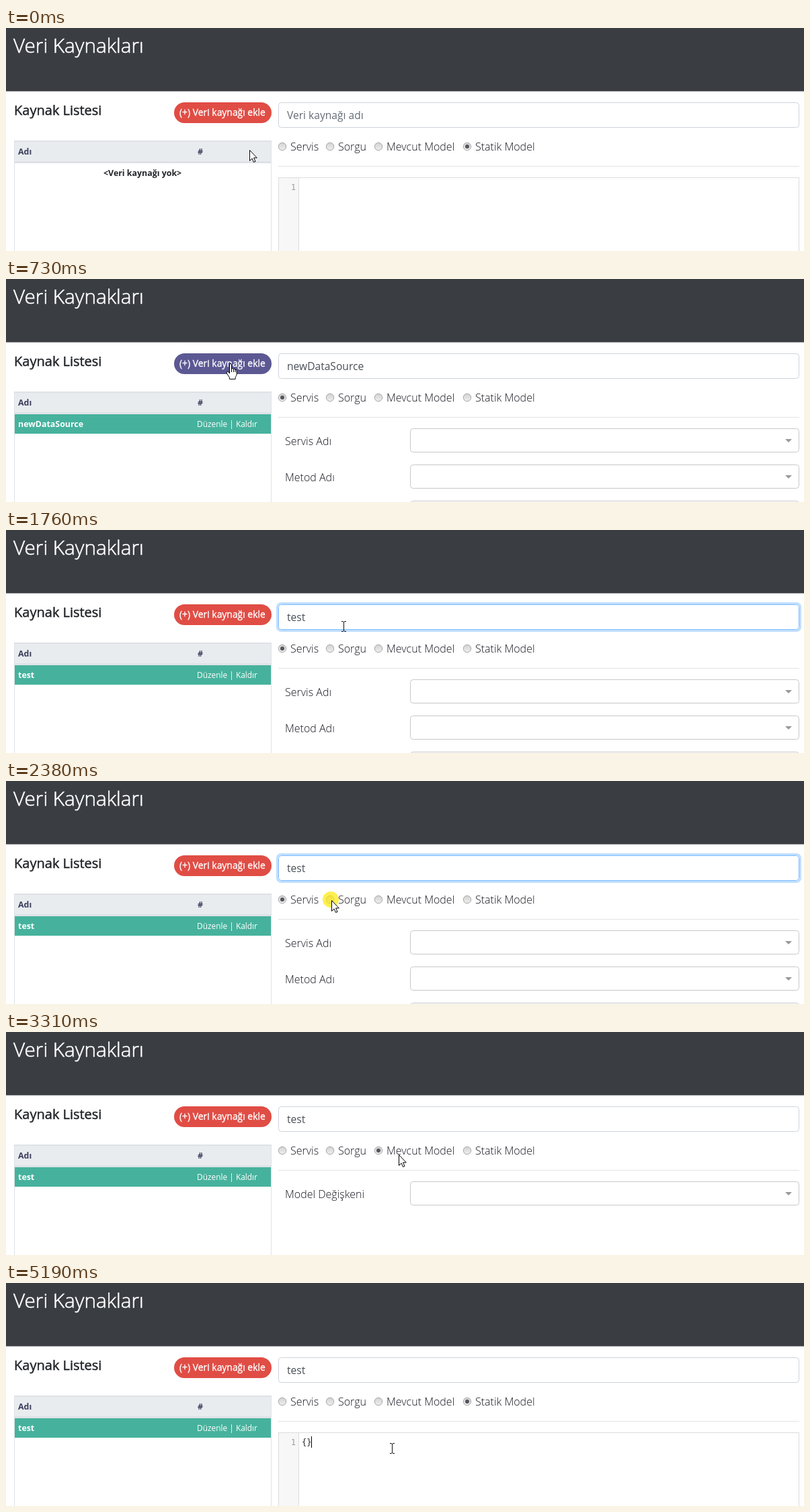
Write an HTML page that moves like this. It is 1187x333 px and loops after 5.21 s.

```html
<!DOCTYPE html>
<html lang="tr">
<head>
<meta charset="utf-8">
<title>Veri Kaynakları</title>
<style>
html, body { margin: 0; width: 1187px; height: 333px; overflow: hidden; background: #fff; }
svg { display: block; font: 16px "Open Sans", "Noto Sans", sans-serif; fill: #212529; }
text { white-space: pre; }
.light { font-weight: 300; fill: #15151f; }
.bold { font-weight: 700; font-size: 12.4px; }
.field { font-size: 15.6px; fill: #495057; }
.title { font-size: 29.7px; font-weight: 300; fill: #fff; stroke: #fff; stroke-width: .6px; }
.heading { font-size: 20px; stroke: #212529; stroke-width: .45px; }
.label { font-size: 13.9px; fill: #fff; stroke: #fff; stroke-width: .35px; }
.box { fill: #fff; stroke: #ced4da; }
.select { fill: #fff; stroke: #c8c8c8; }
.mono { font: 12px "DejaVu Sans Mono", monospace; }
.pointer { fill: #fff; stroke: #000; stroke-linejoin: round; }
</style>
</head>
<body>
<svg width="1187" height="333" viewBox="0 0 1187 333">
  <defs>
    <linearGradient id="knob" x2="0" y2="1">
      <stop stop-color="#d2d2d2"/><stop offset="1" stop-color="#efefef"/>
    </linearGradient>
    <pattern id="wave" width="4" height="3" y="137" patternUnits="userSpaceOnUse">
      <path d="M0 2.5L2 .5L4 2.5" fill="none" stroke="#e03030"/>
    </pattern>
    <g id="select">
      <rect class="select" x="601.5" y=".5" width="578" height="35" rx="4"/>
      <path d="M1159 16h10l-5 5z" fill="#999"/>
    </g>
  </defs>

  <rect width="1187" height="94" fill="#3a3d42"/>
  <path d="M0 94.5H1187" stroke="#999b9d"/>
  <text class="title" x="11" y="37">Veri Kaynakları</text>

  <text class="heading" x="12" y="130">Kaynak Listesi</text>
  <rect id="button" x="250" y="111" width="145" height="31" rx="15.5"/>
  <text class="label" x="258" y="131">(+) Veri kaynağı ekle</text>

  <rect x="12.5" y="168.5" width="382" height="180" fill="#fff" stroke="#dee2e6"/>
  <rect x="12" y="168" width="383" height="34" fill="#dee2e6"/>
  <rect x="13" y="170" width="381" height="29" fill="#e9ecef"/>
  <g class="bold" fill="#3b3f5c">
    <text x="18" y="189">Adı</text>
    <text x="285" y="189">#</text>
  </g>
  <text id="empty" class="bold" x="145" y="221">&lt;Veri kaynağı yok&gt;</text>
  <g id="row" fill="#fff">
    <rect x="13" y="202" width="381" height="29" fill="#46b29d"/>
    <text id="rowName" class="bold" x="18" y="221"></text>
    <text x="284" y="221" font-size="11.9">Düzenle | Kaldır</text>
  </g>

  <rect id="ring" x="403.5" y="109.5" width="778" height="41" rx="5.5" fill="none" stroke="#bfdeff" stroke-width="3"/>
  <rect id="input" class="box" x="405.5" y="111.5" width="774" height="37" rx="4"/>
  <rect id="mark" x="418" y="121" height="18" fill="#3390ff"/>
  <text id="name" class="field" x="418" y="136"></text>
  <rect id="squiggle" x="418" y="137" height="3" fill="url(#wave)"/>

  <g id="radios"></g>
  <path d="M405 206.5H1180" stroke="#e2e2e4"/>

  <g id="servis" class="light">
    <text x="415" y="248">Servis Adı</text><use href="#select" y="223"/>
    <text x="415" y="302">Metod Adı</text><use href="#select" y="277"/>
    <use href="#select" y="331"/>
  </g>
  <g id="sorgu" class="light">
    <text x="415" y="248">Sorgu Adı</text><use href="#select" y="223"/>
  </g>
  <g id="mevcut" class="light">
    <text x="415" y="248">Model Değişkeni</text><use href="#select" y="223"/>
  </g>
  <g id="statik" class="mono">
    <rect x="405.5" y="223.5" width="774" height="130" fill="#fff" stroke="#ddd"/>
    <path d="M406 224H435V333H406z" fill="#f7f7f7"/>
    <path d="M435.5 224V333" stroke="#ddd"/>
    <text x="424" y="242" font-size="11.5" fill="#999">1</text>
    <text id="code" x="440" y="242"></text>
    <path id="caret" d="M.5 229V246" stroke="#000"/>
  </g>

  <circle id="glow" r="12" fill="#ffe800" opacity=".68"/>
  <path id="arrow" class="pointer" d="M.5 .5V16.3L4.1 12.9 6.5 18.4 9 17.3 6.6 11.9H11.3z"/>
  <g id="hand" class="pointer">
    <path d="M-1.5 13V2Q-1.5 .5 0 .5T1.5 2V8Q3.2 6.6 4.4 8.6 6 7.6 7 9.4 9 8.8 9.2 11V16Q9 19 7.2 20.5V23.5H-1.5V21.3L-5.2 15.5Q-6.4 13 -5.2 12.3T-3 13L-1.5 15z"/>
    <path d="M1.5 8V13M4.4 8.6V13M7 9.4V13" fill="none"/>
  </g>
  <path id="beam" d="M-3 -7.5H-1L.5 -6.5 2 -7.5H4M.5 -6.5V6.5M-3 7.5H-1L.5 6.5 2 7.5H4" fill="none" stroke="#111"/>
</svg>
<script>
const LOOP = 5210, MOVE = 350, CLICK = 100;
const home = { x: 362, y: 182 };

// Each move starts at `at` and glides to its target.
const moves = [
  { at: 100, x: 334, y: 126 },   // add button
  { at: 730, x: 486, y: 134 },   // name field
  { at: 1660, x: 566, y: 186 },
  { at: 2010, x: 484, y: 178 },  // second radio
  { at: 2600, x: 580, y: 187 },  // third radio
  { at: 3080, x: 586, y: 181 },
  { at: 3340, x: 723, y: 175 },  // fourth radio
  { at: 4140, x: 574, y: 247 }   // editor
];
const clicks = [530, 1230, 1350, 1450, 2380, 2980, 4040, 4700];

const radios = [
  { id: 'servis', x: 411, label: 'Servis', from: 630 },
  { id: 'sorgu', x: 482, label: 'Sorgu', from: 2480 },
  { id: 'mevcut', x: 554, label: 'Mevcut Model', from: 3080 },
  { id: 'statik', x: 686, label: 'Statik Model', from: 4140 }
];

const $ = id => document.getElementById(id);
const show = (id, on) => $(id).style.display = on ? '' : 'none';
const place = (id, x, y) => $(id).setAttribute('transform', `translate(${x} ${y})`);
const between = (t, a, b) => t >= a && t < b;
const clamp = v => Math.min(1, Math.max(0, v));
const ease = k => k * k * (3 - 2 * k);
const typed = (text, t, from, pace) => text.slice(0, Math.max(0, 1 + Math.floor((t - from) / pace)));

$('radios').innerHTML = radios.map(({ id, x, label }) => `
  <circle cx="${x}" cy="177" r="5.7" fill="url(#knob)" stroke="#a9a9a9"/>
  <circle id="${id}Dot" cx="${x}" cy="177" r="3" fill="#55535d"/>
  <text class="light" x="${x + 12}" y="183">${label}</text>`).join('');

function pointerAt(t) {
  let { x, y } = home;
  for (const m of moves) {
    const k = ease(clamp((t - m.at) / MOVE));
    x += (m.x - x) * k;
    y += (m.y - y) * k;
  }
  return [Math.round(x), Math.round(y)];
}

function drawForm(t) {
  const created = t >= radios[0].from;
  const focus = between(t, 1230, 2480), marked = between(t, 1350, 1550);
  const name = !created ? '' : t < 1550 ? 'newDataSource' : typed('test', t, 1550, 35);

  show('empty', !created);
  show('row', created);
  $('rowName').textContent = name;
  $('name').textContent = name || 'Veri kaynağı adı';
  $('name').style.fill = marked ? '#fff' : name ? '' : '#646c75';
  show('ring', focus);
  $('input').style.stroke = focus ? '#80bdff' : '';
  for (const id of ['mark', 'squiggle']) {
    show(id, marked);
    $(id).setAttribute('width', $('name').getComputedTextLength());
  }
}

function drawMode(t, mode) {
  for (const { id } of radios) {
    show(id, id === mode);
    show(id + 'Dot', id === mode);
  }
  const code = typed('{}', t, 4980, 80);
  $('code').textContent = code;
  show('caret', t >= 4740);
  place('caret', 440 + 7 * code.length, 0);
}

function drawPointer(t, mode) {
  const [x, y] = pointerAt(t);
  const onButton = between(x, 250, 395) && between(y, 111, 142);
  const onText = x > 405 && (between(y, 111, 149) || mode === 'statik' && y > 223);
  const shape = onButton ? 'hand' : onText ? 'beam' : 'arrow';

  $('button').style.fill = onButton && t >= radios[0].from ? '#5c5893' : '#e04d45';
  for (const id of ['arrow', 'hand', 'beam']) {
    show(id, id === shape);
    place(id, x, y);
  }
  show('glow', clicks.some(c => between(t, c, c + CLICK)));
  place('glow', x - 1, y - 1);
}

function render(t) {
  const chosen = radios.filter(r => t >= r.from).pop();
  const mode = chosen ? chosen.id : 'statik';
  drawForm(t);
  drawMode(t, mode);
  drawPointer(t, mode);
}

const start = performance.now();
function frame() {
  render((performance.now() - start) % LOOP);
  requestAnimationFrame(frame);
}
frame();
</script>
</body>
</html>
```
